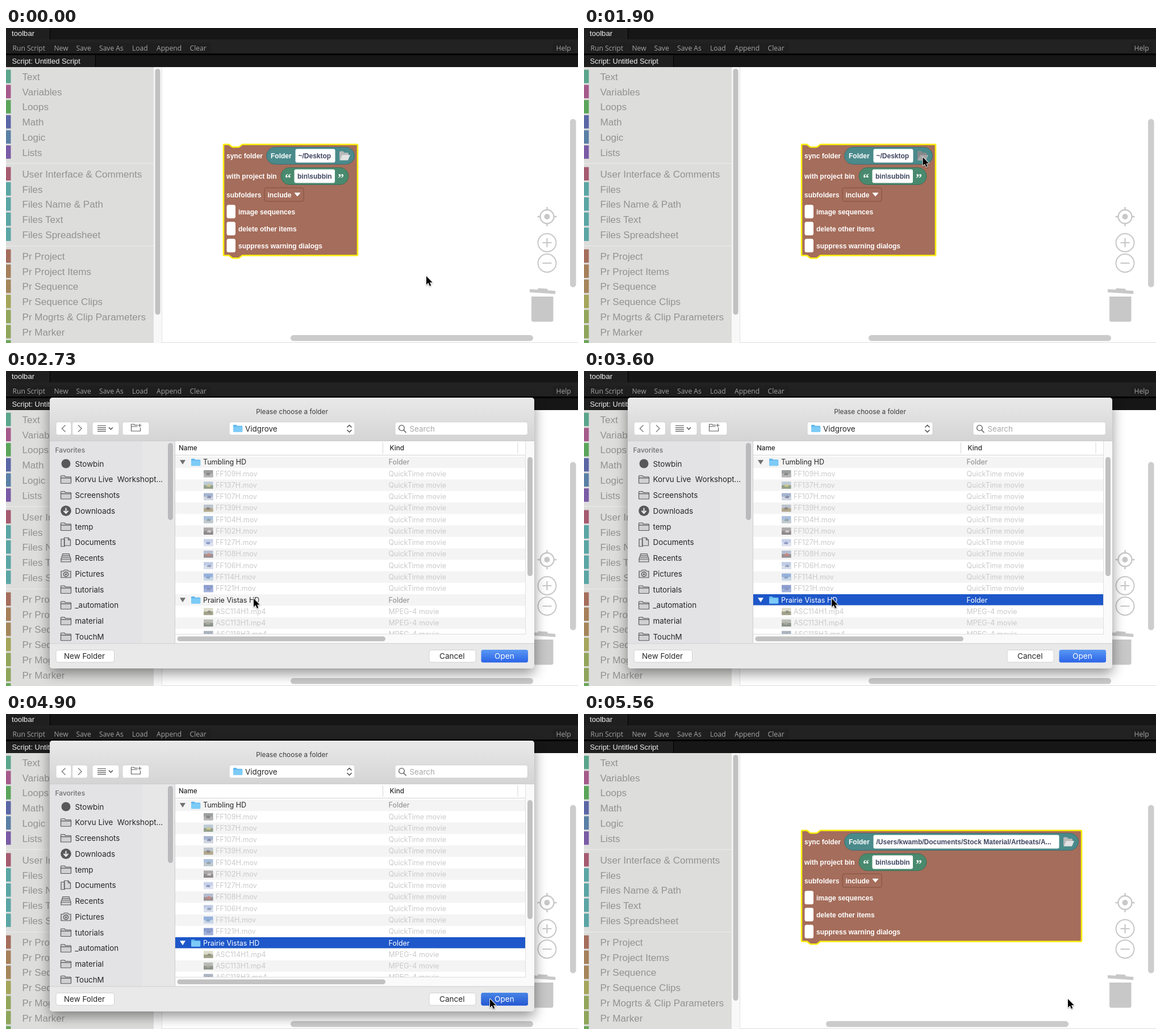
Write an HTML page that moves like this. It is 1007 px wide and 556 px high and loops after 7.76 s.

```html
<!DOCTYPE html>
<html lang="en">
<head>
<meta charset="utf-8">
<title>Choose a folder</title>
<style>
html, body { margin: 0; width: 100%; height: 100%; overflow: hidden; background: #fff; }
svg { display: block; width: 1007px; height: 556px; }
text { white-space: pre; }
.arial { font-family: "Liberation Sans", Arial, sans-serif; }
.menu { font: 12.1px "Open Sans", sans-serif; fill: #a4a4a4; }
.block { font: bold 12px "Liberation Sans", Arial, sans-serif; fill: #fff; }
.field { fill: #3f4560; }
.quote { font: bold 22px "Liberation Serif", serif; }
.ui { font-family: Inter, sans-serif; font-size: 13.4px; fill: #262626; }
.row { font-size: 12.5px; }
.head { font-size: 11.7px; }
.off { fill: #cacaca; }
.dim { fill: #8c8c8c; }
.clip { opacity: .72; }
.panel { filter: drop-shadow(0 9px 11px rgba(0, 0, 0, .42)); }
.ctrl rect { fill: #fff; stroke: #c9c9c9; stroke-width: .8; }

/* one loop: 7760 ms */
#before, #after, #pressedIcon, #dialog, #selection, #barHover, #openDown { animation: 7760ms step-end infinite; }
#before { animation-name: before; }
#after { animation-name: after; }
#pressedIcon { animation-name: icon; }
#dialog { animation-name: dialog; }
#selection { animation-name: select; }
#barHover { animation-name: hover; }
#openDown { animation-name: press; }
#cursor { animation: cursor 7760ms linear infinite; }
@keyframes before { 0% { opacity: 1 } 71.64%, 100% { opacity: 0 } }
@keyframes after { 0% { opacity: 0 } 71.64%, 100% { opacity: 1 } }
@keyframes icon { 0% { opacity: 0 } 24.48%, 100% { opacity: 1 } }
@keyframes dialog { 0% { opacity: 0 } 25.77% { opacity: 1 } 71.26%, 100% { opacity: 0 } }
@keyframes select { 0% { opacity: 0 } 39.43%, 100% { opacity: 1 } }
@keyframes hover { 0% { opacity: 0 } 54.38% { opacity: 1 } 56.7%, 100% { opacity: 0 } }
@keyframes press { 0% { opacity: 0 } 63.14%, 100% { opacity: 1 } }
@keyframes cursor {
  0% { transform: translate(740px, 438px) }
  7.21% { transform: translate(740px, 438px); animation-timing-function: cubic-bezier(.4, 0, .8, .75) }
  12.88% { transform: translate(635px, 294px); animation-timing-function: cubic-bezier(.2, .45, .5, 1) }
  17.13%, 18.6% { transform: translate(600px, 232px) }
  19.71%, 26.16% { transform: translate(596.5px, 228px); animation-timing-function: cubic-bezier(.4, 0, .5, 1) }
  33.5%, 34.6% { transform: translate(435px, 396px) }
  35.17% { transform: translate(436px, 401.5px) }
  46.39% { transform: translate(436px, 401.5px); animation-timing-function: cubic-bezier(.4, .1, .7, .75) }
  51.93% { transform: translate(643px, 449px); animation-timing-function: cubic-bezier(.3, .4, .6, .9) }
  56.18%, 56.6% { transform: translate(787px, 482px); animation-timing-function: cubic-bezier(.2, .5, .5, 1) }
  61.34%, 100% { transform: translate(852px, 503px) }
}
</style>
</head>
<body>
<svg id="stage" viewBox="0 0 1007 556"></svg>
<script>
const rect = (x, y, w, h, fill, r = 0, more = '') =>
  `<rect x="${x}" y="${y}" width="${w}" height="${h}" rx="${r}" fill="${fill}" ${more}/>`;
const text = (x, y, label, cls = '', more = '') =>
  `<text x="${x}" y="${y}" class="${cls}" ${more}>${label.replace(/&/g, '&amp;')}</text>`;
const path = (d, fill = 'none', stroke = 'none', width = 1, more = '') =>
  `<path d="${d}" fill="${fill}" stroke="${stroke}" stroke-width="${width}" ${more}/>`;
const circle = (x, y, r, fill, stroke = 'none', width = 2) =>
  `<circle cx="${x}" cy="${y}" r="${r}" fill="${fill}" stroke="${stroke}" stroke-width="${width}"/>`;
const at = (x, y, body) => `<g transform="translate(${x} ${y})">${body}</g>`;
const group = (id, body) => `<g id="${id}">${body}</g>`;
const gradient = (id, a, b) =>
  `<linearGradient id="${id}" x2="0" y2="1"><stop stop-color="${a}"/><stop offset="1" stop-color="${b}"/></linearGradient>`;

const defs = `<defs>${gradient('titlebar', '#e9e9e9', '#d4d4d4')}${gradient('blue', '#5a98f3', '#2b64e7')}
  ${gradient('blueDown', '#4885e6', '#2457d2')}
  <clipPath id="list">${rect(298, 149, 616, 315)}</clipPath>
  <clipPath id="panelClip">${rect(77, 47, 853, 478, '#fff', 5)}</clipPath></defs>`;

function toolbars() {
  const menu = [[11.5, 'Run Script'], [84.5, 'New'], [123.5, 'Save'], [164, 'Save As'], [222, 'Load'], [265, 'Append'], [323.5, 'Clear'], [968.5, 'Help']];
  return rect(0, 0, 1007, 69, '#161616') + rect(0, 0, 77, 20, '#1f1f1f') + rect(77, 0, 1, 20, '#000') +
    rect(0, 20, 1007, 26, '#222') + rect(3, 26, 358, 18, '#1f1f1f') + rect(963, 26, 38, 18, '#1f1f1f') +
    rect(0, 45, 1007, 3, '#000') + rect(0, 48, 157, 21, '#1f1f1f') + rect(157, 48, 1, 21, '#000') +
    text(10, 14, 'toolbar', 'arial', 'font-size="13.1" fill="#f2f2f2"') +
    text(10.5, 63, 'Script: Untitled Script', 'arial', 'font-size="12.9" fill="#f2f2f2"') +
    menu.map(([x, label]) => text(x, 39.5, label, 'menu')).join('');
}

function toolbox() {
  const groups = [
    [86, ['Text', '#5ba58c'], ['Variables', '#a55b8a'], ['Loops', '#5ba55b'], ['Math', '#5b67a5'], ['Logic', '#5b80a5'], ['Lists', '#7a5ba5']],
    [257.8, ['User Interface & Comments', '#a55b70'], ['Files', '#5ba5a5'], ['Files Name & Path', '#5ba5a5'], ['Files Text', '#5ba5a5'], ['Files Spreadsheet', '#5ba5a5']],
    [403, ['Pr Project', '#a56d5b'], ['Pr Project Items', '#a5805b'], ['Pr Sequence', '#a5865b'], ['Pr Sequence Clips', '#a5a55b'], ['Pr Mogrts & Clip Parameters', '#93a55b'], ['Pr Marker', '#8fa55b'], ['', '#6da55b']],
  ];
  const rows = groups.flatMap(([top, ...items]) => items.map(([label, color], i) => {
    const y = top + i * 26.7;
    return rect(0, y - 12.3, 8.5, 23.6, color) +
      text(28.5, y + 6, label, 'arial', 'font-size="17.1" fill="#929391"');
  }));
  return rect(0, 69, 260, 487, '#dddddc') + rows.join('') +
    rect(0, 238.5, 260, 1.5, '#e8e8e8') + rect(0, 384, 260, 1.5, '#e8e8e8') +
    rect(260, 69, 14, 487, '#f8f8f8') + rect(262.5, 72, 9, 434, '#c1c1c1', 4.5);
}

function workspace() {
  const gray = '#c8c8c8';
  return rect(274, 69, 733, 487, '#fff') + rect(274, 69, 1, 487, '#e2e2e2') + rect(274, 555, 733, 1, '#ddd') +
    rect(993, 160.5, 10.5, 297, '#cdcdcd', 5.2) +
    circle(952.5, 333, 12, 'none', gray, 2.4) + circle(952.5, 333, 5, gray) +
    path('M952.5 316v5m0 24v5M935.5 333h5m24 0h5', 'none', gray, 2.4) +
    circle(952.5, 379, 16, 'none', gray) + circle(952.5, 415, 16, 'none', gray) +
    path('M944.5 379h16m-8-8v16M944.5 415h16', 'none', gray, 2.2) +
    path('M922 461l14 .8 1-2.6 16 1 .8 2.8 13.4 1v5.6l-45.2-3z', gray) +
    path('M925 474h38.5v41q0 3.5-3.5 3.5h-31.5q-3.5 0-3.5-3.5z', gray);
}

const openFolder = (front, back) =>
  path('M0 16V2.5q0-2 2-2h4.5l2 2.5h6q1.5 0 1.5 2v2H6z', back) +
  path('M5 7h14l-4 9.5H.5z', front);

// The sync block; the path field grows by `extra` pixels.
function syncBlock(folder, extra, scrollX) {
  const right = 619 + extra;
  const label = (x, y, s, cls = '') => text(x, y, s, 'block ' + cls);
  const checks = ['image sequences', 'delete other items', 'suppress warning dialogs'].map((s, i) =>
    rect(388.5, 312 + i * 30, 15.5, 24, '#fff', 3.5) + label(409, 328.7 + i * 30, s));
  return rect(scrollX, 542, 427, 10.5, '#cbcbcb', 5.2) +
    path(`M384 205.5h8.5l5 4q1 .8 3 .8h7.5q2 0 3-.8l5-4H${right - 1}q1 0 1 1V400.5q0 1-1 1H416l-5 4q-1 .8-3 .8h-7.5q-2 0-3-.8l-5-4H384q-1 0-1-1V206.5q0-1 1-1z`,
      '#a56d5b', '#fbee0c', 2.6, 'stroke-linejoin="round"') +
    label(388, 230, 'sync folder') +
    rect(458.5, 210.5, 155 + extra, 30, '#4a8a8b', 15, 'stroke="#3b6f70"') +
    label(466, 230, 'Folder') + rect(509.5, 213.5, 70 + extra, 24, '#fff', 3) +
    label(514.5, 230, folder, 'field') + at(587 + extra, 217, openFolder('#e2e2e2', '#b9b9b9')) +
    label(388, 266, 'with project bin') +
    rect(484, 246.5, 119, 30, '#498a6e', 15, 'stroke="#3b6f59"') +
    label(491, 272, '“', 'quote') + rect(507.5, 249.5, 71.5, 24, '#fff', 3) +
    label(513, 266, 'bin\\subbin', 'field') + label(584, 272, '”', 'quote') +
    label(388, 299, 'subfolders') + rect(455, 282, 69, 24, '#a56d5b', 3, 'stroke="#83513f"') +
    label(460.5, 299, 'include') + path('M508 291h10l-5 6z', '#fff', '#fff', .8, 'stroke-linejoin="round"') +
    checks.join('');
}

const blueFolder = path('M0 1.2q0-1.2 1.2-1.2H5.5l1.5 1.7H15q1.2 0 1.2 1.2V11.5q0 1-1 1H1q-1 0-1-1z', '#62b7ec') +
  rect(0, 3.4, 16.2, 9.1, '#7ccbf7', 1);

function sidebar() {
  const dark = '#58585a';
  const folder = path('M.5-5.5q0-1 1-1H7l1.7 2H17.5q1 0 1 1V6q0 1-1 1H1.5q-1 0-1-1zM.5-2.3h18', '#d0d0d2', dark, 1.2);
  const icons = {
    Stowbin: circle(9.5, 0, 8, dark),
    Downloads: circle(9.5, 0, 9.3, dark) + path('M9.5-5v9m-4-4 4 4.3 4-4.3', 'none', '#eee', 2),
    Documents: path('M1-5.5h6v13H1zM6.5-8h7l4 4V6h-11zM13.5-8v4h4', '#d8d8da', dark, 1.2),
    Recents: path('M4-7.5h11l3 9V7H1V1.5zM1 2h17M4-4.5h11M3-1.5h13', '#d0d0d2', dark, 1.2),
    Pictures: path('M1-4.5h4l1.5-2h6l1.5 2h4V7H1z', '#d0d0d2', dark, 1.2) + circle(9.5, 1, 4, 'none', dark, 1.4) + circle(9.5, 1, 1.6, dark),
  };
  const names = ['Stowbin', 'Korvu Live  Workshopt...', 'Screenshots', 'Downloads', 'temp', 'Documents', 'Recents', 'Pictures', 'tutorials', '_automation', 'material', 'TouchM'];
  return rect(77, 124, 220, 357, '#e3e3e5') + rect(240, 124, 57, 357, '#e7e7e8') +
    text(86.5, 144, 'Favorites', '', 'font-weight="500" style="font-size:12px;fill:#6e6e70"') +
    names.map((name, i) => at(96, 163.5 + i * 27.75, (icons[name] || folder) + text(25.5, 5, name))).join('') +
    rect(285, 127, 9, 136, '#bababc', 4.5) + rect(297, 124, 1, 357, '#cdcdcd');
}

// [top, bottom, accent] tones of each small clip preview
const clips = [
  ['FF109H', '#777c7b', '#9a9c99', '#585858'], ['FF137H', '#a9bccb', '#6f8160', '#bfb76a'],
  ['FF107H', '#8298bd', '#bfc5d5', '#59658c'], ['FF139H', '#a9b2bf', '#9c8d65', '#655f58'],
  ['FF104H', '#8aa9d2', '#aab7bc', '#6c8290'], ['FF102H', '#8e8b8c', '#686065', '#c2b9b8'],
  ['FF127H', '#b4c0e2', '#d2d7ea', '#6476ad'], ['FF108H', '#9caac4', '#7a696b', '#bd5f55'],
  ['FF106H', '#a9b9dd', '#cad3e4', '#737fa5'], ['FF114H', '#7198d2', '#b8cbe4', '#6787b8'],
  ['FF121H', '#6078bd', '#7d94cc', '#5a6fab'], ['ASC114H1', '#d0cfb9', '#817f5f', '#666a52'],
  ['ASC113H1', '#a4a99e', '#666f62', '#8d9084'], ['ASC118H3', '#8c98a8', '#787d73', '#646861'],
];

const rowY = i => 161 + i * 20.27;
const folderRow = (i, name, selected) => {
  const y = rowY(i), white = selected ? 'style="fill:#fff"' : '';
  return (selected ? rect(298, 394, 616, 19.4, '#1d57c9') : '') +
    path(`M306 ${y - 4}h10l-5 8z`, selected ? '#fff' : '#717171') + at(326, y - 6.3, blueFolder) +
    text(347, y + 4.3, name, 'row', white) + text(673.5, y + 4.3, 'Folder', 'row dim', white);
};
const clipRow = ([name, top, bottom, accent], n) => {
  const y = rowY(n < 11 ? n + 1 : n + 2), mp4 = n > 10;
  return '<g class="clip">' + rect(348, y - 6.3, 16.5, 12.6, top) + rect(348, y, 16.5, 6.3, bottom) +
    path(`M${351 + n % 3} ${y + 2}l4-4 5 2-2 3z`, accent) + '</g>' +
    text(369, y + 4.3, name + (mp4 ? '.mp4' : '.mov'), 'row off') +
    text(673.5, y + 4.3, mp4 ? 'MPEG-4 movie' : 'QuickTime movie', 'row off');
};

function fileList() {
  let stripes = '';
  for (let i = 0; i < 16; i += 2) stripes += rect(298, rowY(i) - 10.1, 616, 20.27, '#f4f4f4');
  const second = 'Prairie Vistas HD';
  return rect(298, 124, 632, 357, '#fff') + rect(915, 124, 15, 357, '#fafafa') + rect(298, 465, 632, 16, '#fafafa') +
    text(304, 139.5, 'Name', 'head', 'font-weight="500"') + text(675.5, 139.5, 'Kind', 'head', 'font-weight="500"') +
    rect(663, 126, 1, 20, '#d6d6d6') + rect(900.5, 126, 1, 20, '#d6d6d6') + rect(298, 148, 616, 1, '#d2d2d2') +
    `<g clip-path="url(#list)">${stripes}${folderRow(0, 'Tumbling HD')}${folderRow(12, second)}
      ${clips.map(clipRow).join('')}${group('selection', folderRow(12, second, true))}</g>` +
    rect(914, 124, 1, 341, '#e0e0e0') + rect(298, 464, 617, 1, '#dedede') +
    rect(918, 152, 9, 210, '#c1c1c1', 4.5) + rect(301.5, 468.5, 366.5, 8.5, '#c1c1c1', 4.2) +
    group('barHover', rect(301.5, 468.5, 366.5, 8.5, '#858585', 4.2));
}

function dialog() {
  const ink = '#585858';
  const frames = [[88, 90, 27, 23], [116.5, 90, 27, 23], [152, 90, 47, 23], [205, 90, 47, 23], [393, 90, 221, 23],
    [685, 90, 233.5, 23], [88, 492.5, 102.5, 21.5], [745, 492.5, 82, 21.5]];
  const openText = text(860, 508, 'Open', '', 'font-size="13.6" style="fill:#fff"');
  return rect(77, 47, 853, 478, '#e9e9e9', 5, 'class="panel"') +
    `<g class="ui" clip-path="url(#panelClip)">` +
    rect(77, 47, 853, 77, 'url(#titlebar)') + rect(77, 123.5, 853, 1, '#c6c6c6') +
    text(503.5, 76, 'Please choose a folder', '', 'style="font-size:11.75px;fill:#3c3c3c" text-anchor="middle"') +
    sidebar() + fileList() + rect(77, 480.5, 853, 45, '#e9e9e9') + rect(77, 480.5, 853, 1, '#cfcfcf') +
    `<g class="ctrl">${frames.map(([x, y, w, h]) => rect(x, y, w, h, '#fff', 3.5)).join('')}</g>` +
    path('M104.5 95.5l-6 6 6 6', 'none', '#858585', 1.6) + path('M127 95.5l6 6-6 6', 'none', '#858585', 1.6) +
    path('M161 96.5h15m-15 3.3h15m-15 3.3h15m-15 3.3h15', 'none', ink, 1.2) + path('M181 99.5l3.5 3.5 3.5-3.5', 'none', ink, 1.6) +
    path('M232 95.5h-5.5l-1.5-1.5h-4.5v12h16v-6M220.5 98h11M235.5 93v6m-3-3h6', 'none', ink, 1.1) +
    at(400, 95, blueFolder) + text(421, 106.5, 'Vidgrove') +
    path('M600.5 99.5l4-4 4 4m-8 4.5l4 4 4-4', 'none', '#484848', 1.5) +
    circle(696.5, 100.5, 4.8, 'none', ink, 1.3) + path('M700 104.3l4.5 4.5', 'none', ink, 1.5) +
    text(710.5, 106.5, 'Search', '', 'style="fill:#a9a9a9"') +
    text(102, 508, 'New Folder') + text(763, 508, 'Cancel', '', 'font-size="13.6"') +
    rect(836.5, 492, 82.5, 22.5, 'url(#blue)', 3.5) + openText +
    group('openDown', rect(836.5, 492, 82.5, 22.5, 'url(#blueDown)', 3.5) + openText) + '</g>';
}

const arrow = path('M0 0V15L3.5 11.8 5.9 17.2 8.3 16.2 6 10.9H10.7Z', '#000', '#fff', 1.8,
  'paint-order="stroke" stroke-linejoin="round" style="filter:drop-shadow(0 1px 1px rgba(0,0,0,.35))"');

document.getElementById('stage').innerHTML = defs + toolbox() + workspace() +
  group('before', syncBlock('~/Desktop', 0, 501) + group('pressedIcon', at(587, 217, openFolder('#a3a5a5', '#858888')))) +
  group('after', syncBlock('/Users/kwamb/Documents/Stock Material/Artbeats/A...', 257, 426)) +
  toolbars() + group('dialog', dialog()) + group('cursor', arrow);
</script>
</body>
</html>
```
